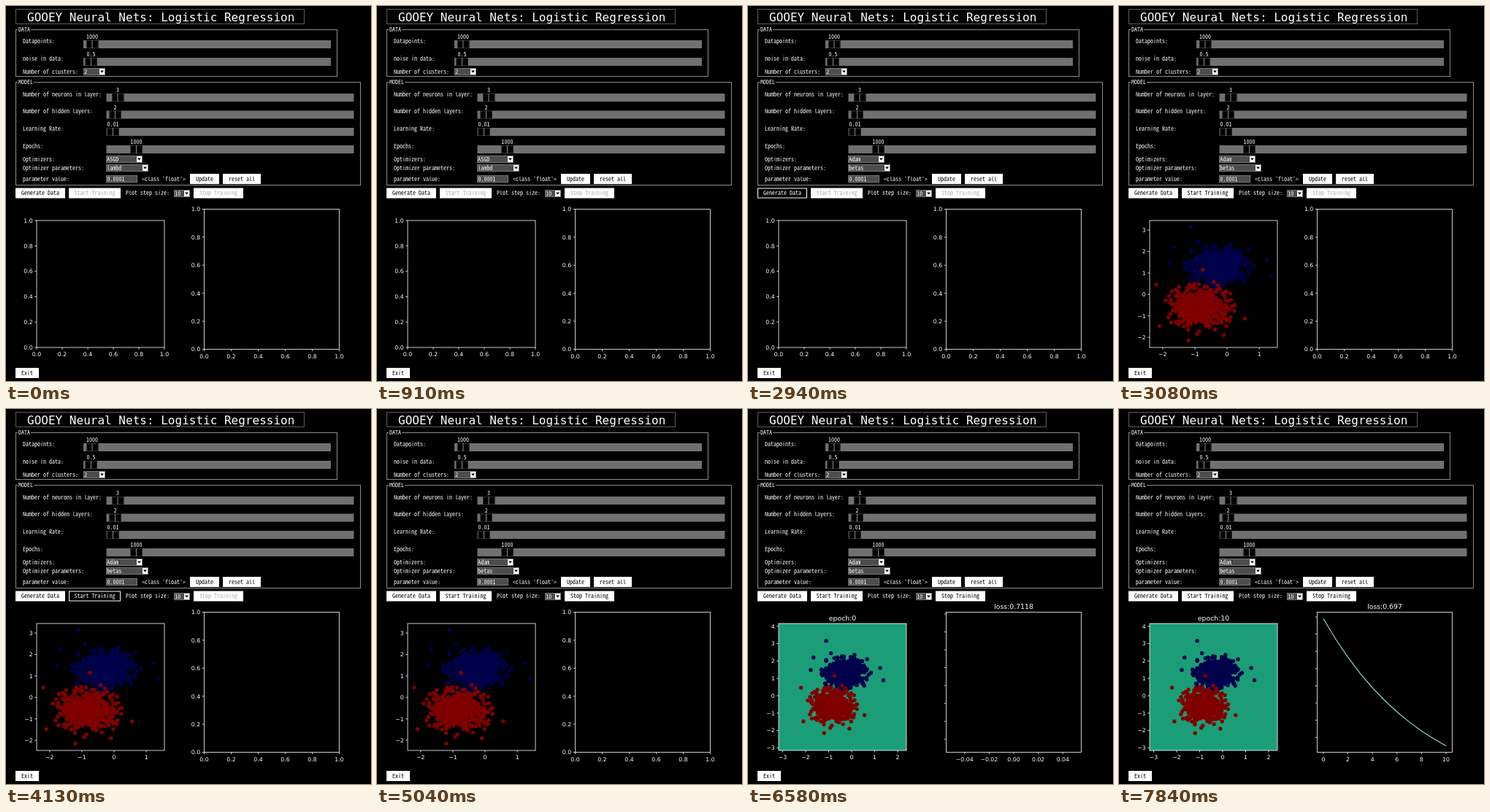
Animation of 500x514 px, one loop 8000 ms. Source, as an HTML page with a canvas:

```html
<!DOCTYPE html>
<html lang="en">
<head>
<meta charset="utf-8">
<title>Logistic Regression</title>
<style>
html, body { margin: 0; width: 100%; height: 100%; overflow: hidden; background: #000; }
canvas { display: block; width: 500px; height: 514px; }
</style>
</head>
<body>
<canvas id="stage" width="500" height="514"></canvas>
<script>
const ctx = document.getElementById('stage').getContext('2d');
const LOOP = 8000;
const NARROW = '"Noto Sans Mono CJK JP", "Noto Sans Mono CJK SC", "DejaVu Sans Mono", monospace';
const MONO = '"DejaVu Sans Mono", monospace';
const SANS = '"DejaVu Sans", sans-serif';
const FIELD = '#4d4d4d', TROUGH = '#707070', GREEN = '#1b9e77';
const BLUE = '#00004c', RED = '#800000';

const within = (t, from, to) => t >= from && t < to;

// Font size at which one monospace cell has the given width
function sizeForCell(family, cell) {
  ctx.font = `100px ${family}`;
  return cell * 100 / ctx.measureText('0').width;
}
const LABEL_SIZE = sizeForCell(NARROW, 4);
const TITLE_SIZE = sizeForCell(MONO, 9.65);

function rect(x, y, w, h, color) {
  ctx.fillStyle = color;
  ctx.fillRect(x, y, w, h);
}

function outline(x, y, w, h, color) {
  ctx.strokeStyle = color;
  ctx.lineWidth = 1;
  ctx.strokeRect(x + 0.5, y + 0.5, w - 1, h - 1);
}

function segment(x1, y1, x2, y2) {
  ctx.beginPath();
  ctx.moveTo(x1, y1);
  ctx.lineTo(x2, y2);
  ctx.stroke();
}

// y is the middle of the capital letters
function text(str, x, y, { size = LABEL_SIZE, family = NARROW, color = '#fff', align = 'left' } = {}) {
  ctx.font = `${size}px ${family}`;
  ctx.fillStyle = color;
  ctx.textAlign = align;
  ctx.fillText(str, x, y + size * 0.365);
}

function group(name, x, y, w, h) {
  outline(x, y, w, h, '#8c8c8c');
  rect(x + 3, y - 3, name.length * 4 + 2, 7, '#000');
  text(name, x + 4, y);
}

function slider(label, value, x, y, knob) {
  text(label, 23, y + 1);
  rect(x, y, 339, 11, TROUGH);
  rect(knob - 8, y, 16.5, 11, '#000');
  outline(knob - 8, y, 16.5, 11, '#2c2c2c');
  rect(knob - 0.5, y, 1, 11, '#8a8a8a');
  text(value, knob, y - 4.5, { align: 'center' });
}

function combo(value, x, y, w, pressed = false) {
  rect(x, y, w, 10, FIELD);
  outline(x, y, w, 10, '#777');
  text(value, x + 1.2, y + 5);
  const bx = x + w - 8;
  rect(bx, y + 1, 7, 8, pressed ? '#000' : '#fff');
  ctx.fillStyle = pressed ? '#fff' : '#000';
  ctx.beginPath();
  ctx.moveTo(bx + 1, y + 3.6);
  ctx.lineTo(bx + 6, y + 3.6);
  ctx.lineTo(bx + 3.5, y + 6.6);
  ctx.fill();
}

function button(label, x, y, w, { enabled = true, pressed = false } = {}) {
  const h = 14;
  rect(x, y, w, h, pressed ? '#000' : '#fff');
  if (pressed) outline(x, y, w, h, '#fff');
  const color = !enabled ? '#b0b0b0' : pressed ? '#fff' : '#000';
  text(label, x + w / 2, y + 7, { color, align: 'center' });
}

// Two Gaussian clusters with evenly spread radii, plus their most distant members
const points = (() => {
  let seed = 20;
  const random = () => (seed = (seed * 16807) % 2147483647) / 2147483647;
  const list = [];
  const cluster = (color, cx, cy, sigma, outliers) => {
    const count = 490;
    for (let i = 0; i < count; i++) {
      const r = sigma * Math.sqrt(-2 * Math.log(1 - 0.97 * (i + 0.5) / count));
      const a = 2 * Math.PI * random();
      list.push({ x: cx + r * Math.cos(a), y: cy + r * Math.sin(a), color });
    }
    for (const [x, y] of outliers) list.push({ x, y, color });
  };
  cluster(BLUE, -0.27, 1.3, 0.43,
    [[-1.11, 3.16], [1.24, 1.6], [1.38, 0.89], [-1.78, 1.48], [-1.66, 2.2], [-0.9, 2.45], [0.67, 2.1]]);
  cluster(RED, -0.8, -0.55, 0.46,
    [[-2.2, 0.46], [-2.1, -1.48], [-1.2, -2.15], [-0.93, -1.85], [-0.1, -1.9], [0.56, -1.12], [-0.75, 1.15]]);
  return list;
})();

const LEFT = { x: 42, y: 294, w: 175, h: 174 };
const RIGHT = { x: 271.5, y: 278.5, w: 185, h: 192 };

const range = (from, to, step) =>
  Array.from({ length: Math.round((to - from) / step) + 1 }, (_, i) => from + i * step);
const number = (v, digits) => v.toFixed(digits).replace('-', '\u2212').replace(/^\u2212(0\.?0*)$/, '$1');

// Axis maps: zero is the pixel of value 0, unit the pixels per 1
const unitX = box => ({ zero: box.x, unit: box.w, ticks: range(0, 1, 0.2), digits: 1 });
const unitY = box => ({ zero: box.y + box.h, unit: -box.h, ticks: range(0, 1, 0.2), digits: 1 });

function axes(box, xAxis, yAxis, title) {
  ctx.strokeStyle = '#fff';
  ctx.lineWidth = 0.8;
  ctx.strokeRect(box.x, box.y, box.w, box.h);
  const bottom = box.y + box.h;
  const font = { size: 7.75, family: SANS };
  for (const v of xAxis.ticks) {
    const x = xAxis.zero + v * xAxis.unit;
    segment(x, bottom, x, bottom + 2.7);
    text(number(v, xAxis.digits), x, bottom + 9.3, { ...font, align: 'center' });
  }
  for (const v of yAxis.ticks) {
    const y = yAxis.zero + v * yAxis.unit;
    segment(box.x - 2.7, y, box.x, y);
    if (!yAxis.hidden) text(number(v, yAxis.digits), box.x - 5.4, y, { ...font, align: 'right' });
  }
  if (title) text(title, box.x + box.w / 2, box.y - 7.8, { size: 9.3, family: SANS, align: 'center' });
}

function scatter(xAxis, yAxis) {
  for (const p of points) {
    ctx.fillStyle = p.color;
    ctx.beginPath();
    ctx.arc(xAxis.zero + p.x * xAxis.unit, yAxis.zero + p.y * yAxis.unit, 2.7, 0, 2 * Math.PI);
    ctx.fill();
  }
}

function dataPlot(t) {
  if (t < 3080) return axes(LEFT, unitX(LEFT), unitY(LEFT));
  const trained = t >= 5600;
  const xAxis = trained
    ? { zero: 142, unit: 31.5, ticks: range(-3, 2, 1), digits: 0 }
    : { zero: 148, unit: 44.1, ticks: range(-2, 1, 1), digits: 0 };
  const yAxis = trained
    ? { zero: 393, unit: -23.8, ticks: range(-3, 4, 1), digits: 0 }
    : { zero: 395.3, unit: -29.4, ticks: range(-2, 3, 1), digits: 0 };
  if (trained) rect(LEFT.x, LEFT.y, LEFT.w, LEFT.h, GREEN);
  scatter(xAxis, yAxis);
  axes(LEFT, xAxis, yAxis, trained && `epoch:${t < 7070 ? 0 : 10}`);
}

function lossPlot(t) {
  if (t < 5670) return axes(RIGHT, unitX(RIGHT), unitY(RIGHT));
  if (t < 7070) {
    const xAxis = { zero: 364, unit: 1682, ticks: range(-0.04, 0.04, 0.02), digits: 2 };
    const yAxis = { zero: 281 + 0.75 * 2452, unit: -2452, ticks: range(0.68, 0.75, 0.01), hidden: true };
    return axes(RIGHT, xAxis, yAxis, 'loss:0.7118');
  }
  const xAxis = { zero: 279.9, unit: 16.8, ticks: range(0, 10, 2), digits: 0 };
  const yAxis = { zero: 285 + 0.712 * 11800, unit: -11800, ticks: range(0.698, 0.712, 0.002), hidden: true };
  axes(RIGHT, xAxis, yAxis, 'loss:0.697');
  const decay = 0.79 ** 0.5;
  ctx.strokeStyle = '#8dd3c7';
  ctx.lineWidth = 1.2;
  ctx.beginPath();
  for (let epoch = 0; epoch <= 10; epoch++) {
    const fall = (1 - decay ** epoch) / (1 - decay ** 10);
    ctx.lineTo(xAxis.zero + epoch * xAxis.unit, 287.2 + 174.6 * fall);
  }
  ctx.stroke();
}

// The text caret blinks 630 ms on, about 320 ms off
const caretOff = [[2800, 3150], [3780, 4060], [4690, 5040], [5600, 5950], [6580, 6930], [7560, 7840]];
const caretOn = t => t >= 2170 && !caretOff.some(([a, b]) => within(t, a, b));

function controls(t) {
  const chosen = t >= 2170;
  outline(13, 4, 396, 21, '#5c5c5c');
  text('GOOEY Neural Nets: Logistic Regression', 29, 15, { size: TITLE_SIZE, family: MONO });

  group('DATA', 13, 32, 441, 65);
  slider('Datapoints:', '1000', 106, 47, 118);
  slider('noise in data:', '0.5', 106, 71, 116.5);
  text('Number of clusters:', 23, 90);
  combo('2', 106, 85, 30);

  group('MODEL', 13, 104, 473, 142);
  slider('Number of neurons in layer:', '3', 137.5, 120, 153);
  slider('Number of hidden layers:', '2', 137.5, 143.5, 149.5);
  slider('Learning Rate:', '0.01', 137.5, 167, 146.5);
  slider('Epochs:', '1000', 137.5, 191, 178.5);
  text('Optimizers:', 23, 210);
  combo(chosen ? 'Adam' : 'ASGD', 137, 205, 50, within(t, 700, 910));
  if (caretOn(t)) rect(154, 207, 1, 5, '#222');
  text('Optimizer parameters:', 23, 222);
  combo(chosen ? 'betas' : 'lambd', 137, 217, 58);
  text('parameter value:', 23, 237);
  rect(137, 232, 43, 10, FIELD);
  outline(137, 232, 43, 10, '#777');
  text('0.0001', 138.5, 237);
  text("<class 'float'>", 186, 237);
  button('Update', 252, 230, 40);
  button('reset all', 297, 230, 52);

  button('Generate Data', 13, 249.5, 68, { pressed: within(t, 2940, 3080) });
  button('Start Training', 86, 249.5, 71, { enabled: t >= 3080, pressed: within(t, 4060, 4200) });
  text('Plot step size:', 164, 256);
  combo('10', 230, 252, 22);
  button('Stop Training', 257, 249.5, 68, { enabled: t >= 4200 });
  button('Exit', 13, 496, 32);
}

function draw(now) {
  const t = now % LOOP;
  rect(0, 0, 500, 514, '#000');
  controls(t);
  dataPlot(t);
  lossPlot(t);
}

let start;
function tick(now) {
  start ??= now;
  draw(now - start);
  requestAnimationFrame(tick);
}
draw(0);
requestAnimationFrame(tick);
</script>
</body>
</html>
```
